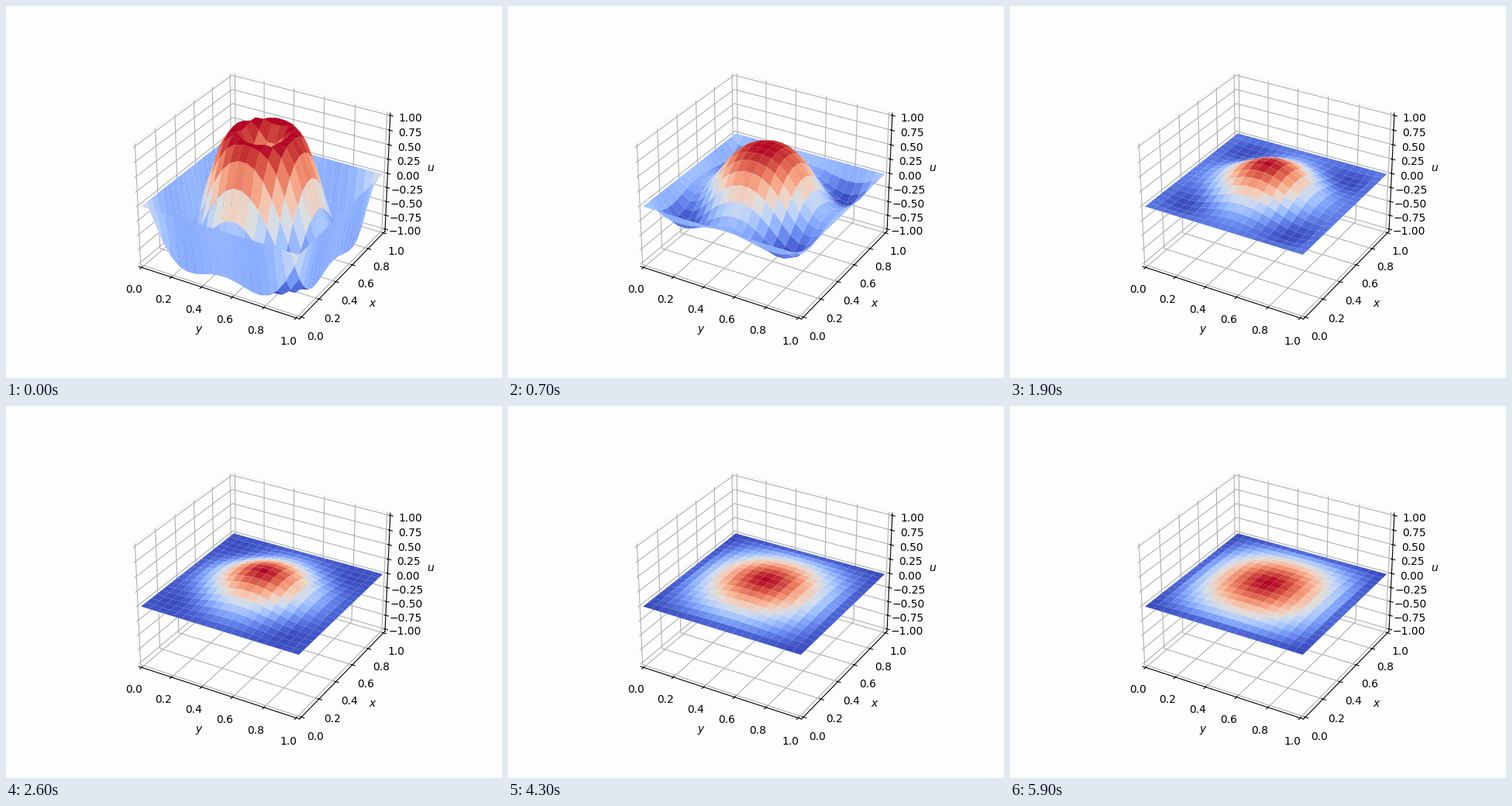
A matplotlib script for the animation above (6000 ms loop, 640 by 480 pixels).

```python
import matplotlib.pyplot as plt
import numpy as np
from matplotlib.animation import FuncAnimation

FRAMES, INTERVAL = 60, 100
POINTS = 20
ALPHA, DT, SUBSTEPS = 0.01, 0.01, 10
PAPER, PANE_EDGE = "#fdfdfd", "#f5f5f5"
PAD = 1 / 48

grid = np.linspace(0, 1, POINTS)
X, Y = np.meshgrid(grid, grid)
RATIO = ALPHA * DT / (grid[1] - grid[0]) ** 2


def initial_state():
    """Radial ripple, held at zero on the border."""
    u = np.sin(3 * np.pi * np.hypot(X - 0.5, Y - 0.5))
    u[[0, -1], :] = 0
    u[:, [0, -1]] = 0
    return u


def diffuse(u):
    """Advance the heat equation by one frame."""
    u = u.copy()
    for _ in range(SUBSTEPS):
        laplacian = (u[2:, 1:-1] + u[:-2, 1:-1] + u[1:-1, 2:]
                     + u[1:-1, :-2] - 4 * u[1:-1, 1:-1])
        u[1:-1, 1:-1] += RATIO * laplacian
    return u


states = [initial_state()]
while len(states) < FRAMES:
    states.append(diffuse(states[-1]))

fig = plt.figure(figsize=(6.4, 4.8), dpi=100, facecolor=PAPER)
ax = fig.add_subplot(projection="3d", facecolor=PAPER)
ax.set_xlim(-PAD, 1 + PAD)
ax.set_ylim(-PAD, 1 + PAD)
ax.set_zlim(-1 - 2 * PAD, 1 + 2 * PAD)
ax.set_xticks(np.linspace(0, 1, 6))
ax.set_yticks(np.linspace(0, 1, 6))
ax.set_zticks(np.linspace(-1, 1, 9))
ax.set_xlabel("$y$")
ax.set_ylabel("$x$")
ax.set_zlabel("$u$")
for axis in (ax.xaxis, ax.yaxis, ax.zaxis):
    axis.set_pane_color(PAPER)
    axis.pane.set_edgecolor(PANE_EDGE)


def draw(i):
    for old in list(ax.collections):
        old.remove()
    return [ax.plot_surface(X, Y, states[i], cmap="coolwarm")]


anim = FuncAnimation(fig, draw, frames=FRAMES, interval=INTERVAL,
                     init_func=lambda: draw(0), repeat=True, repeat_delay=0)
plt.show()
```
